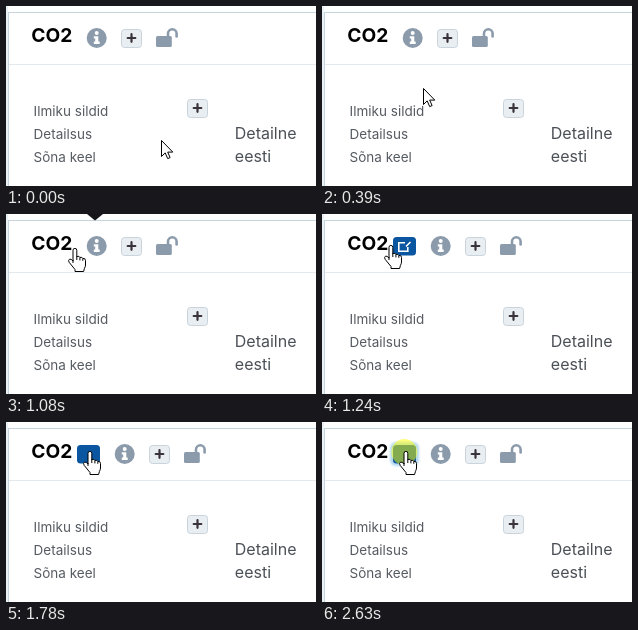
An HTML page for the animation above (2780 ms loop, 310 by 180 pixels).

```html
<!DOCTYPE html>
<html lang="et">
<head>
<meta charset="utf-8">
<title>CO2</title>
<style>
  html, body { margin: 0; width: 100%; height: 100%; overflow: hidden; background: #fff; }
  svg { display: block; width: 310px; height: 180px; }
  text { font-family: Inter, "Liberation Sans", sans-serif; fill: #4b5057; }
  .title { font-size: 19.2px; font-weight: 700; fill: #000; }
  .label { font-size: 13.5px; fill: #565b62; }
  .value { font-size: 16px; }
  .hint text { font: 12px "Open Sans", sans-serif; fill: #575757; }
  .icon { fill: #8b9bab; }

  /* every change is a hard step in one 2780 ms loop */
  .step { animation: 2780ms step-end infinite; }
  .pointer { animation-name: move; }
  .arrow { animation-name: arrow; }
  .hand { animation-name: hand; }
  .tail { animation-name: tail; }
  .tools { animation-name: shift; }
  .copy { animation-name: copy; }
  .glyph { animation-name: glyph; }
  .press { animation-name: press; }
  .hint { animation-name: hint; }

  @keyframes move {
    0% { transform: translate(155px, 134px); }
    3.23% { transform: translate(149px, 128px); }
    6.47% { transform: translate(138px, 117px); }
    8.63% { transform: translate(125px, 105px); }
    11.87% { transform: translate(112px, 92px); }
    14.02% { transform: translate(101px, 82px); }
    17.26% { transform: translate(88px, 68px); }
    19.42% { transform: translate(79px, 59px); }
    24.82% { transform: translate(69px, 50px); }
    28.05% { transform: translate(67px, 47px); }
    30.57% { transform: translate(66px, 45px); }
    35.61% { transform: translate(64px, 39px); }
    38.84% { transform: translate(62px, 34px); }
    42.08% { transform: translate(60px, 32px); }
    44.60% { transform: translate(62px, 31px); }
    47.48% { transform: translate(71px, 29px); }
    49.99% { transform: translate(76px, 27px); }
    53.23% { transform: translate(79px, 26px); }
    55.39% { transform: translate(80px, 27px); }
    58.63% { transform: translate(81px, 28px); }
    60.79% { transform: translate(75px, 28px); }
    64.02%, 100% { transform: translate(77px, 29px); }
  }
  @keyframes arrow {
    0%, 47.48% { opacity: 1; }
    24.82%, 60.79%, 100% { opacity: 0; }
  }
  @keyframes hand {
    0%, 47.48% { opacity: 0; }
    24.82%, 60.79%, 100% { opacity: 1; }
  }
  @keyframes tail {
    0%, 44.60%, 100% { opacity: 0; }
    30.57% { opacity: 1; }
  }
  @keyframes shift {
    0% { transform: none; }
    44.60%, 100% { transform: translateX(28px); }
  }
  @keyframes copy {
    0% { opacity: 0; }
    44.60%, 100% { opacity: 1; }
  }
  @keyframes glyph {
    0% { opacity: 1; }
    60.79%, 100% { opacity: 0; }
  }
  @keyframes press {
    0% { opacity: 0; }
    94.60%, 100% { opacity: 1; }
  }
  @keyframes hint {
    0%, 94.60%, 100% { opacity: 0; }
    83.81% { opacity: 1; }
  }
</style>
</head>
<body>
<svg viewBox="0 0 310 180">
  <defs>
    <g id="plus">
      <rect x=".5" y=".5" width="20" height="18" rx="3" fill="#e9eef3" stroke="#c9d3dc"/>
      <path d="M10.5 5.2v7.6M6.7 9h7.6" stroke="#3a333b" stroke-width="2.2" stroke-linecap="round"/>
    </g>
    <filter id="soft" x="-20%" y="-20%" width="140%" height="140%">
      <feGaussianBlur stdDeviation=".8"/>
    </filter>
  </defs>

  <!-- panel -->
  <rect width="2" height="180" fill="#eaf2f5"/>
  <path d="M2.5 6v174M2 6.5h308" stroke="#c7d6de" fill="none"/>
  <path d="M3 58.5h307" stroke="#e4e9ed"/>

  <text class="title" x="25.3" y="36">CO2</text>
  <text class="label" x="27.6" y="110">Ilmiku sildid</text>
  <text class="label" x="27.6" y="133">Detailsus</text>
  <text class="label" x="27.6" y="156">Sõna keel</text>
  <text class="value" x="228.8" y="133">Detailne</text>
  <text class="value" x="228.8" y="156">eesti</text>
  <use href="#plus" x="181" y="93"/>

  <!-- header tools -->
  <g class="step tools">
    <circle class="icon" cx="90.7" cy="32" r="10"/>
    <circle cx="90.7" cy="27" r="2" fill="#fff"/>
    <path d="M87.8 30.2h4.5v5.3h1.4v2.4h-5.9v-2.4h1.4v-2.9h-1.4z" fill="#fff"/>
    <use href="#plus" x="115" y="23"/>
    <rect class="icon" x="150" y="30" width="15.8" height="11" rx="1.5"/>
    <path d="M162 31v-3.4a4.3 4.3 0 0 1 8.6 0v2.9" fill="none" stroke="#8b9bab" stroke-width="2.6" stroke-linecap="round"/>
  </g>

  <!-- copy button -->
  <g class="step copy">
    <rect class="step press" x="68" y="20" width="29" height="24" rx="6" fill="#b3d9ef" filter="url(#soft)"/>
    <rect x="71" y="23" width="23" height="18.5" rx="3.5" fill="#0b56a0"/>
    <g class="step glyph" fill="none" stroke="#fff" stroke-width="1.6">
      <path d="M83 28.7h-6.2v8.6h9V33M84 32.5l4.5-4.5"/>
    </g>
  </g>

  <path class="step tail" d="M81 0h16l-8 6.5z" fill="#15151a"/>

  <g class="step hint">
    <rect x="94" y="46" width="51" height="22" fill="#000" opacity=".18" filter="url(#soft)"/>
    <rect x="92.5" y="44.5" width="49" height="20" fill="#fff" stroke="#767676"/>
    <text x="96" y="59">Kopeeri</text>
  </g>

  <!-- click highlight -->
  <circle class="step press" cx="82.3" cy="30" r="13" fill="#ff0" fill-opacity=".5"/>

  <!-- pointer -->
  <g class="step pointer" fill="#fff" stroke="#000" stroke-linejoin="round">
    <path class="step arrow" d="M.5 .5v16l3.7-3.6 2.5 5.7 2.4-1-2.4-5.5h5.1z"/>
    <g class="step hand">
      <path d="M5 13V2.3a1.9 1.9 0 0 1 3.8 0v6.2q2.7-.8 3.1.9 2.4-.6 2.9 1 2.7-.4 2.7 2V17q0 1.6-1.1 3.5l-.8 3H7v-2L1.2 14.4Q-.2 12.3 1.5 11.2 3 10.6 5 13z"/>
      <path d="M5 12v3M8.8 8v4M11.9 9.4v3M14.8 10.4v2.4" fill="none"/>
    </g>
  </g>
</svg>
</body>
</html>
```
